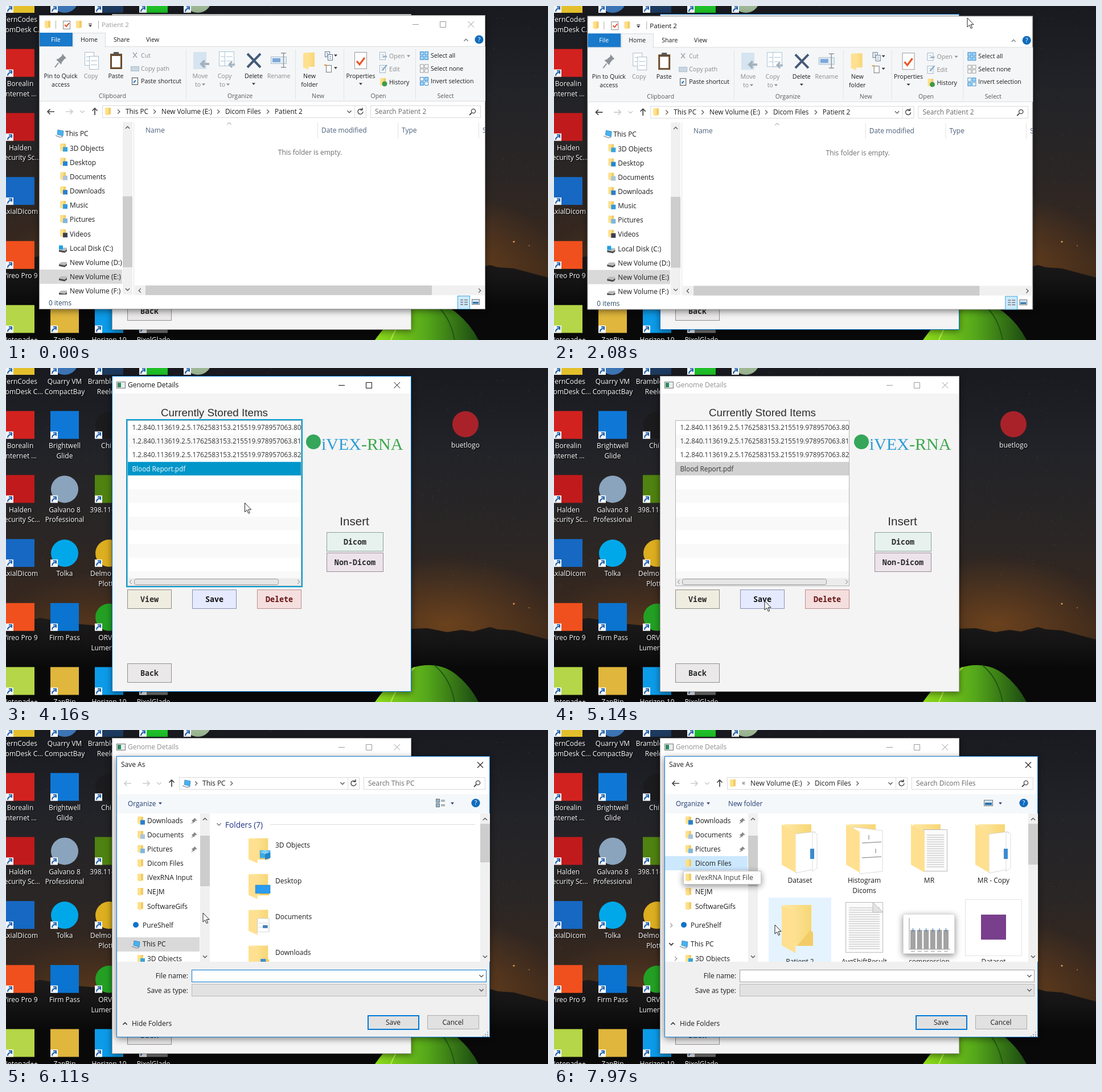
Animation of 952 by 588 pixels, one loop 8 s. Source, as an HTML page:

```html
<!DOCTYPE html>
<html lang="en">
<head>
<meta charset="utf-8">
<title>Saving a file</title>
<style>
html, body { margin: 0; width: 952px; height: 588px; overflow: hidden; background: #0b0a0a; }
svg { display: block; }
text { font-family: "Open Sans", "Noto Sans", sans-serif; white-space: pre; }
.mid { text-anchor: middle; }
.end { text-anchor: end; }
.head { font-family: "Liberation Sans", Arial, sans-serif; }
.mono { font-family: "Noto Sans Mono", "DejaVu Sans Mono", monospace; font-weight: 700; text-anchor: middle; }
.serif { font-family: "Liberation Serif", serif; }
.label { text-anchor: middle; text-shadow: 1px 1px 2px #000; }
.shadow { filter: drop-shadow(0 3px 6px #0007); }
</style>
</head>
<body>
<svg id="stage" width="952" height="588" viewBox="0 0 952 588">
  <defs>
    <linearGradient id="sky" x2="0" y2="1">
      <stop offset="0" stop-color="#181a1f"/><stop offset=".25" stop-color="#222328"/>
      <stop offset=".5" stop-color="#2a2625"/><stop offset=".7" stop-color="#36271e"/><stop offset=".78" stop-color="#3e2a1b"/>
    </linearGradient>
    <linearGradient id="ridge" x2="0" y2="1">
      <stop offset="0" stop-color="#1c1a1a"/><stop offset=".3" stop-color="#151414"/><stop offset=".6" stop-color="#090909"/>
    </linearGradient>
    <radialGradient id="glow"><stop offset="0" stop-color="#98591f" stop-opacity=".5"/><stop offset="1" stop-color="#98591f" stop-opacity="0"/></radialGradient>
    <linearGradient id="tent"><stop offset="0" stop-color="#8fdc1c"/><stop offset=".5" stop-color="#55a81a"/><stop offset="1" stop-color="#1c4a12"/></linearGradient>
    <linearGradient id="gold"><stop offset="0" stop-color="#ffe8a4"/><stop offset="1" stop-color="#f7d675"/></linearGradient>
  </defs>
  <g id="desktop"></g>
  <g id="scene"></g>
</svg>
<script>
const LOOP = 8000, INK = '#1c1c1c', GREY = '#8b8b8b', BLUE = '#0078d7';

// Drawing helpers; text is placed by the middle of its line
const T = (x, y, s, size = 12, fill = INK, cls = '') =>
  `<text x="${x}" y="${y + size * .36}" font-size="${size}" fill="${fill}" class="${cls}">${s}</text>`;
const R = (x, y, w, h, fill, line, more = '') => line
  ? `<rect x="${x + .5}" y="${y + .5}" width="${w - 1}" height="${h - 1}" fill="${fill}" stroke="${line}" ${more}/>`
  : `<rect x="${x}" y="${y}" width="${w}" height="${h}" fill="${fill}" ${more}/>`;
const P = (d, line = '#444', w = 1.2, fill = 'none') =>
  `<path d="${d}" stroke="${line}" stroke-width="${w}" fill="${fill}"/>`;
const C = (x, y, r, fill) => `<circle cx="${x}" cy="${y}" r="${r}" fill="${fill}"/>`;
const G = (body, move, more = '') => `<g transform="${move}" ${more}>${body}</g>`;
const clip = (x, y, w, h, body) =>
  `<svg x="${x}" y="${y}" width="${w}" height="${h}" viewBox="${x} ${y} ${w} ${h}">${body}</svg>`;
const each = (list, f) => list.map(f).join('');
const tri = (x, y, c = '#333') => P(`M${x - 3} ${y - 1.5}h6l-3 3.5z`, 'none', 0, c);
const chev = (x, y, turn = 0, c = '#555', w = 1.3) =>
  G(P('M-1.8-3.6 1.8 0-1.8 3.6', c, w), `translate(${x} ${y}) rotate(${turn})`);
const arrow = (x, y, turn, c) => G(P('M6 0H-6M-1.5-4.5-6 0l4.5 4.5', c, 1.7), `translate(${x} ${y}) rotate(${turn})`);
const help = (x, y) => C(x, y, 7.6, '#0f6cbd') + T(x, y, '?', 11, '#fff', 'mid');

// Icons
const folder = (x, y) => R(x + 2, y, 8, 12, '#f0cc68') + P(`M${x} ${y}h6v14l-6-2z`, 'none', 0, '#ffe08a');
const marked = (x, y, c) => folder(x, y) + R(x + 5, y + 6, 8, 8, c);
const pc = (x, y) => P(`M${x + 4} ${y}l10 2-1 9-10-3z`, '#2b78b5', .7, '#48b2ee') + P(`M${x} ${y + 10}l8 3 5-1`, '#8fa0ac', 1.5);
const drive = (x, y) => P(`M${x} ${y + 6}l4-3h10v5l-4 3-10-1z`, 'none', 0, '#b9bcbe') + P(`M${x} ${y + 7}l10 2 4-3v3l-4 3-10-2z`, 'none', 0, '#4a4a4a');
const sheet = (x, y, w = 13, h = 15, c = '#9aa5af') =>
  R(x, y, w, h, '#fff', c) + P(`M${x + 3} ${y + h * .35}h${w - 6}m0 ${h * .3}h${6 - w}`, c, 1);
const bigFolder = (x, y, inside = '') => R(x + 4, y + 1, 48, 72, 'url(#gold)') +
  P(`M${x + 50} ${y + 46}l5 3v24h-28z`, 'none', 0, '#f2cc66') + inside +
  P(`M${x} ${y + 1}l24 13v72l-24-14z`, 'none', 0, '#ffe090');
const lined = (x, y, w, h) => R(x, y, w, h, '#fbfbfb', '#bbb') +
  each([...Array(Math.floor(h / 4) - 3).keys()], i => P(`M${x + 6} ${y + 10 + i * 4}h${w - 12}`, '#a8a8a8', .8));

const windowButtons = (x, y, c) =>
  P(`M${x} ${y + .5}h11M${x + 48.5} ${y - 4.5}h10v10h-10zM${x + 97.5} ${y - 5}l10.5 10.5m0-10.5l-10.5 10.5`, c, 1);
const scrollbar = (x, y, h, top, bottom) => R(x, y, 17, h, '#f0f0f0') + R(x, top, 17, bottom - top, '#cdcdcd') +
  chev(x + 8.5, y + 10, 270) + chev(x + 8.5, y + h - 9, 90);
const addressBar = (x, y, right, end, back, place, search) =>
  arrow(x + 7, y, 0, back) + arrow(x + 39, y, 180, '#ccc') + chev(x + 62, y, 90, '#999', 1) + arrow(x + 84, y, 90, '#444') +
  R(x + 97, y - 11, right - x - 97, 22, '#fff', '#d9d9d9') + place + chev(right - 30, y, 90) +
  R(right - 21, y - 11, 1, 22, '#ddd') +
  P(`M${right - 7} ${y - 3}a4.5 4.5 0 1 0 1 3m-1-7v4h-4`, '#444', 1.4) +
  R(right + 7, y - 11, end - right - 7, 22, '#fff', '#d9d9d9') + T(right + 15, y, search, 12, '#6a6a6a') +
  `<circle cx="${end - 13}" cy="${y - 1}" r="3.6" fill="none" stroke="#444" stroke-width="1.3"/>` +
  P(`M${end - 16} ${y + 2}l-4 4`, '#444', 1.8);

function desktop() {
  let seed = 7, out = R(0, 0, 952, 588, 'url(#sky)') +
    '<ellipse cx="775" cy="450" rx="200" ry="120" fill="url(#glow)"/><ellipse cx="150" cy="450" rx="160" ry="90" fill="url(#glow)" opacity=".5"/>';
  const rnd = () => (seed = seed * 16807 % 2147483647) / 2147483647;
  for (let i = 0; i < 420; i++)
    out += `<circle cx="${(rnd() * 952).toFixed(1)}" cy="${(rnd() * 400).toFixed(1)}" r=".5" fill="#c9ccd2" opacity="${(rnd() * .4).toFixed(2)}"/>`;
  out += C(892, 415, 1.6, '#e8a050') + C(919, 422, 1, '#c07830') +
    P('M0 452l60-12 60 10 70 6 500 4 50-2 35 7 25-4 20 3 30-8 14 4 28 2 60 16V588H0z', 'none', 0, 'url(#ridge)') +
    P('M648 588Q682 540 712 528Q758 514 790 539Q816 560 830 588z', 'none', 0, 'url(#tent)') +
    P('M752 523Q780 545 788 588', '#1f5a12', 2) + P('M718 527Q690 553 676 588', '#b6ee4a', 2);
  const icons = [
    [0, 0, '#e3c02b', 0, 'FernCodes', 'LoomDesk C...'], [1, 0, '#3c74b4', 1, 'Quarry VM', 'CompactBay'],
    [2, 0, '#1d3a5f', 0, 'Brambleware', 'Reelora'], [3, 0, '#1fbf28', 0], [4, 0, '#9db795', 1],
    [0, 1, '#d1221f', 0, 'Borealin', 'Internet ...'], [1, 1, '#0f78d7', 0, 'Brightwell', 'Glide'], [2, 1, '#1b1b1d', 1, 'Chirr'],
    [0, 2, '#c11a1c', 0, 'Halden', 'Security Sc...'], [1, 2, '#8ba4be', 1, 'Galvano 8', 'Professional'], [2, 2, '#4f8210', 0, '398.11-desk'],
    [0, 3, '#1668c2', 0, 'AxialDicom'], [1, 3, '#00a8ea', 1, 'Tolka'], [2, 3, '#dcae20', 1, 'Delmo Pack', 'Plotter'],
    [0, 4, '#f0501e', 0, 'Vireo Pro 9'], [1, 4, '#0b74d0', 0, 'Firm Pass'], [2, 4, '#23a023', 1, 'ORVEX', 'Lumen Dev'],
    [0, 5, '#b5d648', 0, 'Notepad++'], [1, 5, '#e0b63c', 0, 'ZapBin'], [2, 5, '#0c9be8', 0, 'Horizon 10'], [3, 5, '#777', 0, 'PixelGlade'],
  ];
  out += each(icons, ([col, row, color, round, a = '', b = '']) => {
    const x = 25 + col * 78, y = 24 + row * 112.7;
    return (round ? C(x, y - 36, 24, color) : R(x - 25, y - 61, 50, 49, color)) +
      R(x - 25, y - 25, 13, 13, '#f4f6f8') + P(`M${x - 22} ${y - 14}q0-5 6-6m-4-2.5h5v5`, '#1b5fae', 2) +
      T(x, y, a, 12, '#fff', 'label') + T(x, y + 17.5, b, 12, '#fff', 'label');
  });
  return out + C(807, 99, 23, '#a9222a') + T(807, 136, 'buetlogo', 12, '#fff', 'label');
}

function explorer(t) {
  if (t >= 2310) return '';
  const active = t >= 1970, S = 10.6;
  const rt = (x, y, s, c = INK, cls = 'mid') => T(x, y, s, S, c, cls);
  const lt = (x, y, s, c = INK) => rt(x, y, s, c, '');
  let o = R(58, 16, 784, 518, '#fff', '#9a9a9a', 'class="shadow"');

  // Title and tabs
  o += folder(68, 26) + R(87, 26, 1, 14, '#aaa') + R(100, 26, 13, 15, '#fff', '#888') + P('M103 33l3 3 5-6', '#e0522b', 2) +
    folder(123, 26) + tri(148, 35) + R(145, 31, 6, 1, '#333') + R(162, 26, 1, 14, '#aaa') +
    T(168, 33, 'Patient 2', 11.6, active ? '#111' : '#999') + (active ? '' : windowButtons(714, 32, '#999')) +
    R(59, 47, 58, 25, '#1979ca') + lt(79, 59, 'File', '#fff') + R(59, 72, 783, 95, '#f5f6f7') +
    R(59, 71, 783, 1, '#dadbdc') + R(118, 47, 57, 26, '#f5f6f7', '#dadbdc') + R(119, 71, 55, 3, '#f5f6f7') +
    lt(131, 59, 'Home') + lt(189, 59, 'Share') + lt(246, 59, 'View') + chev(808, 60, 270, '#777') + help(831, 59) +
    R(59, 167, 783, 1, '#dadbdc') + each([316, 508, 593, 719], x => R(x, 76, 1, 88, '#e2e3e4'));

  // Ribbon
  o += P('M99 84l7 8-3 1-5 6-1 4-9-9 4-1 6-5z', 'none', 0, '#8b9299') + P('M92 100l-6 8', '#8b9299', 2) +
    each(['Pin to Quick', 'access'], (s, i) => rt(96, 123 + 15 * i, s)) +
    sheet(138, 81, 17, 24, '#a9bccb') + sheet(146, 88, 17, 24, '#a9bccb') + rt(149, 123, 'Copy', GREY) +
    R(183, 84, 21, 27, '#6b4a2c') + R(189, 81, 9, 5, '#555') + R(186, 88, 15, 20, '#fff') + rt(193, 123, 'Paste') +
    P('M223 82l7 9m0-9l-7 9', '#9aa5b0', 1.4) + lt(237, 87, 'Cut', GREY) +
    R(219, 106, 15, 9, '#c9d6e2', '#a9bccb') + lt(237, 110, 'Copy path', GREY) +
    R(221, 126, 11, 13, '#fff', '#444') + P('M224 135l4-4', '#1b6fc0', 2) + lt(237, 132, 'Paste shortcut') + rt(187, 158, 'Clipboard', '#5a5a5a') +
    R(329, 81, 23, 30, '#d5e4f0') + P('M357 102h-14m6-6l-6 6 6 6', '#a4b2be', 4) + rt(341, 123, 'Move', GREY) + rt(337, 138, 'to', GREY) + tri(347, 138, GREY) +
    sheet(374, 80, 17, 26, '#a9c3d8') + sheet(384, 80, 17, 26, '#a9c3d8') + P('M402 103h-10m5-5l-5 5 5 5', '#a4b2be', 3) +
    rt(384, 123, 'Copy', GREY) + rt(380, 138, 'to', GREY) + tri(390, 138, GREY) +
    P('M424 84l23 24m0-24l-23 24', '#445a78', 4) + rt(435, 123, 'Delete') + tri(435, 137) +
    R(465, 89, 28, 13, '#e4eef6', '#a9bccb') + R(468, 92, 14, 7, '#7ba8d8') + P('M483 83h9m-4.5 0v25m-4.5 0h9', '#8b9299', 1.4) + rt(479, 123, 'Rename', GREY) + rt(411, 158, 'Organize', '#5a5a5a') +
    R(524, 82, 18, 25, 'url(#gold)') + P('M522 83l9 4v25l-9-4z', 'none', 0, '#ffe090') + rt(533, 123, 'New') + rt(533, 138, 'folder') +
    sheet(560, 80, 9, 10, '#55738f') + sheet(565, 85, 9, 11, '#55738f') + tri(579, 87) + R(562, 104, 10, 13, '#fff', '#777') + P('M559 104h4', '#d89a2a', 2) + tri(579, 109) + rt(548, 158, 'New', '#5a5a5a') +
    R(612, 81, 22, 30, '#fff', '#999') + P('M616 97l5 6 9-12', '#e8562a', 3.2) + rt(623, 123, 'Properties') + tri(623, 137) +
    sheet(656, 81, 11, 14, '#9db4c8') + P('M669 89h-7', '#9db4c8', 3) + lt(673, 88, 'Open', GREY) + tri(707, 88, GREY) +
    sheet(656, 104, 11, 14, '#9db4c8') + P('M669 104l-8 9', '#7ea6c6', 2) + lt(673, 111, 'Edit', GREY) +
    folder(657, 127) + C(665, 137, 4.5, '#3f9a4a') + lt(673, 134, 'History') + rt(654, 158, 'Open', '#5a5a5a');
  o += each(['Select all', 'Select none', 'Invert selection'], (s, i) => {
    const y = 80 + 22.5 * i;
    return each([0, 1, 2, 3], k => R(727 + (k % 2) * 8, y + (k >> 1) * 8, 7, 7,
      i == 0 || (i == 2 && (k == 1 || k == 2)) ? '#9fd3f7' : '#fff', i == 1 ? '#999' : '#3a8fd0')) + lt(746, y + 7.3, s);
  }) + rt(772, 158, 'Select', '#5a5a5a');

  o += addressBar(72, 186, 633, 834, '#444', folder(174, 179) +
    each([[210, 'This PC'], [273, 'New Volume (E:)'], [385, 'Dicom Files'], [472, 'Patient 2']],
      ([x, s]) => chev(x - 12, 186) + T(x, 185.5, s, 11.8)), 'Search Patient 2');

  // Navigation
  const rows = ['3D Objects', 'Desktop', 'Documents', 'Downloads', 'Music', 'Pictures', 'Videos',
    'Local Disk (C:)', 'New Volume (D:)', 'New Volume (E:)', 'New Volume (F:)'];
  const marks = ['#35a5dc', '#1f86d8', '#a9c4dc', '#2a7fd0', '#2f9be0', '#7db7de', '#3b3f52'];
  o += clip(59, 204, 145, 304, R(59, 464, 145, 25, '#d9d9d9') + pc(87, 218) + T(104, 225, 'This PC') +
    each(rows, (s, i) => {
      const y = 250.3 + 25.17 * i;
      return (i < 7 ? marked(95, y - 8, marks[i]) : drive(93, y - 4) + (i == 7 ? R(93, y - 5, 7, 7, '#1ba1e8') : '')) + T(112, y, s, 11.9);
    })) + scrollbar(205, 204, 304, 335, 460) + R(224, 204, 1, 304, '#e4e4e4');

  // File list
  o += each([547, 688, 830], x => R(x, 205, 1, 28, '#e2e2e2')) + chev(392, 207, 270, '#888', 1) +
    clip(226, 205, 616, 60, each([[245, 'Name'], [554, 'Date modified'], [695, 'Type'], [837, 'Size']], ([x, s]) => T(x, 219, s, 12, '#4c607a'))) +
    T(534, 258, 'This folder is empty.', 12, '#6d6d6d', 'mid') +
    R(226, 492, 615, 17, '#f0f0f0') + R(245, 492, 503, 17, '#cdcdcd') + chev(235, 501, 180) + chev(832, 501) +
    T(75, 523, '0 items', 11.8, '#2b4a66') + R(793, 510, 22, 24, '#cfeafb', '#3aa6dd') +
    each([0, 4, 8], d => P(`M798 ${517.5 + d}h5m2 0h6`, '#777', 1.5)) + R(818, 516, 14, 10, '#cfe3f2', '#777') + R(820, 521, 10, 3, '#2b6fa8');
  if (t < 2080) return o;
  return t < 2190 ? G(o, 'translate(.5 1.4) scale(.9985)') : G(o, 'translate(45 60) scale(.9)', 'opacity=".45"');
}

function app(t) {
  const active = t >= 2080 && t < 5040, focus = t >= 3730 && t < 4930;
  const heat = t < 2630 ? 0 : t < 2740 ? .7 : t < 2840 ? .45 : t < 2960 ? .2 : 0;
  const button = (x, y, w, s, fill, line, ink = '#2b2b2b') => R(x, y, w, 34, fill, line) + T(x + w / 2, y + 17, s, 13.4, ink, 'mono');
  const uid = '1.2.840.113619.2.5.1762583153.215519.978957063.8';
  let o = R(186, 14, 526, 556, '#f4f4f4', active ? BLUE : '#aaa', 'class="shadow"') + R(187, 15, 524, 30, '#fff') +
    R(662, 15, 49, 30, '#e81123', '', `opacity="${heat}"`) +
    R(194, 24, 16, 12, '#e8eef2', '#777') + R(196, 26, 6, 8, '#2d8a5a') +
    T(214, 30, 'Genome Details', 12, active ? '#111' : '#8f8f8f') + windowButtons(584, 30, active ? '#111' : '#9a9a9a') +
    T(366, 78, 'Currently Stored Items', 18.8, '#2c2c2c', 'head mid') + T(612, 270, 'Insert', 20.6, '#2c2c2c', 'head mid');
  o += R(213, 92, 306, 292, '#fff', '#b4b4b4') + clip(214, 93, 304, 277,
    each([...Array(12).keys()], i => R(214, 93 + 24.1 * i, 304, 24.1, i == 3 ? (focus ? '#0096c9' : '#d1d1d1') : i % 2 ? '#f9f9f9' : '#fff')) +
    each([uid + 0, uid + 1, uid + 2, 'Blood Report.pdf'], (s, i) => T(221.5, 105 + 24.1 * i, s, 11.75, i == 3 && focus ? '#fff' : '#333'))) +
    R(214, 370, 304, 13, '#ececec') + R(225, 371, 254, 11, '#e6e6e6', '#999', 'rx="3"') + chev(219, 376.5, 180, '#777', 1) + chev(514, 376.5, 0, '#777', 1) +
    (focus ? `<rect x="212" y="91" width="308" height="294" fill="none" stroke="#039ed3" stroke-width="2"/>` : '');
  return o + C(540, 130, 13, '#35a65a') + T(554, 133, 'iVEX<tspan fill="#3aa84c">-RNA</tspan>', 30, '#2a9bd6', 'serif') +
    button(213, 390, 78, 'View', '#efece0', '#8f8c80') + button(327, 390, 78, 'Save', '#e5eaff', '#8792b5', '#111') +
    button(441, 390, 78, 'Delete', '#f5dede', '#b98f8f', '#651111') + button(213, 520, 78, 'Back', '#eae8e9', '#8f8d8e') +
    button(563, 289, 100, 'Dicom', '#e7f2ef', '#8aa099') + button(563, 325, 100, 'Non-Dicom', '#ece3eb', '#978c95');
}

function pcFolders(t) {
  const inside = [
    R(30, 42, 28, 26, '#3fa9e4') + P('M30 48l14-7 14 7-14 7z', 'none', 0, '#7fd0f5') + P('M44 55l14-7v20l-14 6z', 'none', 0, '#2587c8'),
    R(18, 38, 40, 29, '#2b9cf0', '#1671b8'), sheet(23, 30, 32, 46, '#a9bccb') + R(38, 53, 13, 10, '#3c7fb8'), R(32, 46, 14, 40, '#3f8fd4')];
  return chev(374, 166, 90, '#777') + T(385, 167, 'Folders (7)', 13.6, '#1e3287') + R(464, 166, 360, 1, '#dcdcdc') +
    (t >= 5700 && t < 5930 ? R(378, 372, 260, 60, '#e5f3ff') : '') +
    each(['3D Objects', 'Desktop', 'Documents', 'Downloads'], (s, i) => {
      const y = 190 + 63 * i;
      return G(bigFolder(0, 0) + inside[i], `translate(426 ${y}) scale(.66 .52)`) + T(473, y + 13, s);
    });
}

function dicomFiles(t) {
  const slides = P('M24 18l34-4v66l-34 7z', '#c8c8c8', .7, '#fff') + P('M54 14l8 4v60l-8 6z', '#ccc', .7, '#fff') + R(50, 44, 7, 18, '#3b8bd0');
  const papers = P('M12 6l52 6v72l-40 4z', '#c9c9c9', .7, '#fff') + P('M28 34l34-2M28 60l34-2M40 20v8M52 44v8', '#777', 1);
  const spots = [432, 545, 659, 772];
  return (t >= 7970 ? R(377, 295, 110, 120, '#e5f3ff') : '') +
    each([slides, papers, G(lined(0, 0, 42, 74), 'translate(22 10)'), slides], (s, i) => G(bigFolder(0, 0, s), `translate(${spots[i] - 32} 165)`)) +
    each(['Dataset', 'Histogram', 'MR', 'MR - Copy'], (s, i) => T(spots[i], 265, s, 12, INK, 'mid')) + T(545, 283, 'Dicoms', 12, INK, 'mid') +
    bigFolder(400, 307) + lined(512, 303, 66, 89) + P('M560 303l18 18h-18z', '#bbb', 1, '#e2e2e2') +
    R(613, 324, 91, 70, '#fff', '#ddd', 'class="shadow"') + P('M624 331v55h72', '#777', .8) +
    each([0, 1, 2, 3, 4, 5], i => R(626 + 11.6 * i, 352, 9, 34, '#a3a3a3') + P(`M${630.5 + 11.6 * i} 349v6`, '#2b6fc0', 1) + R(627 + 11.6 * i, 389, 7, 1, '#999')) +
    R(722, 298, 100, 100, '#fff', '#e2e2e2') + R(750, 325, 44, 44, '#7a3f8c') +
    each(['Patient 2', 'AvgShiftResult', 'compression', 'Dataset'], (s, i) => T(spots[i], 407.5, s, 12, INK, 'mid'));
}

function dialog(t) {
  if (t < 5250) return '';
  const opened = t >= 7310, clicked = t >= 7210, hover = t >= 6880, chevrons = t >= 6350;
  let o = R(194, 46, 656, 495, '#f0f0f0', '#1a80d9', 'class="shadow"') + R(195, 47, 654, 66, '#fff') + R(195, 113, 654, 34, '#f5f8fa') +
    T(202, 61, 'Save As') + P('M828 56.5l10 10m0-10l-10 10', '#222', 1.1) +
    addressBar(207, 94, 621, 842, opened ? '#444' : '#ccc', opened
      ? folder(309, 87) + T(330, 93, '«', 12, '#555') + T(345, 94, 'New Volume (E:)') + chev(447, 94) + T(458, 94, 'Dicom Files') + chev(533, 94)
      : pc(310, 88) + chev(334, 94) + T(345, 94, 'This PC') + chev(396, 94), opened ? 'Search Dicom Files' : 'Search This PC') +
    T(214, 129.5, 'Organize', 11.8, '#1f3b73') + tri(271, 129, '#1f3b73') + (opened ? T(306, 129.5, 'New folder', 11.8, '#1f3b73') : '') +
    (opened ? R(755, 123, 16, 11, '#cfe3f2', '#777') + R(757, 128, 12, 4, '#2b6fa8') : each([121, 129], y => R(755, y, 7, 7, '#8bb8d8', '#777') + R(764, y + 2, 7, 1, '#777') + R(764, y + 4, 7, 1, '#777'))) +
    tri(784, 129, '#1f3b73') + help(825, 128.5) + R(195, 147, 654, 261, '#fff');

  const rows = ['Downloads', 'Documents', 'Pictures', 'Dicom Files', 'iVexRNA Input', 'NEJM', 'SoftwareGifs'];
  const marks = ['#2a7fd0', '#a9c4dc', '#7db7de'];
  const tint = opened ? R(195, 222, 145, 25, '#cce8ff') : clicked ? R(195, 222, 145, 25, '#cce8ff', '#99d1ff') : hover ? R(195, 222, 145, 25, '#e5f3ff') : '';
  o += clip(195, 147, 145, 261, tint + (clicked ? '' : R(195, 365, 145, 25, '#d9d9d9')) +
    each(rows, (s, i) => {
      const y = 159.6 + 25.1 * i;
      return (i < 3 ? marked(231, y - 7, marks[i]) + P(`M331 ${y - 5}l5 5-3 0-3 4-4-4 4-3z`, 'none', 0, '#8a8a8a') + P(`M329 ${y + 2}l-3 3`, '#8a8a8a') : folder(231, y - 7)) + T(248, y, s);
    }) + C(228, 343, 5, '#1273c8') + T(240, 344, 'PureShelf') + pc(221, 371) + T(240, 377, 'This PC') + marked(231, 396, '#35a5dc') + T(248, 402.5, '3D Objects') +
    (chevrons ? chev(206, 344, 0, '#999') + chev(206, 377, 90, '#333', 1.7) + chev(214, 402.5, 0, '#999') : '')) +
    scrollbar(341, 147, 261, 186, 275) +
    clip(359, 147, 474, 261, !opened ? pcFolders(t) : t >= 7450 ? dicomFiles(t) : '') + scrollbar(833, 147, 261, 165, opened ? 237 : 233);

  o += T(320, 433, 'File name:', 12, INK, 'end') + R(326, 422, 518, 22, '#fff', opened ? '#a0a0a0' : BLUE) + chev(835, 433, 90) +
    T(320, 458.5, 'Save as type:', 12, INK, 'end') + R(326, 447, 518, 22, '#e2e2e2', '#b8b8b8') + chev(835, 458, 90) +
    chev(209, 517, 270, '#333', 1.6) + T(221, 517, 'Hide Folders') +
    `<rect x="636" y="503" width="89" height="24" fill="#e1e1e1" stroke="${BLUE}" stroke-width="2"/>` + T(680, 515, 'Save', 12, INK, 'mid') +
    R(740, 502, 91, 25, '#e1e1e1', '#adadad') + T(785, 515, 'Cancel', 12, INK, 'mid') +
    each([[845, 531], [841, 535], [845, 535], [837, 538], [841, 538], [845, 538]], ([x, y]) => R(x, y, 2, 2, '#aaa'));
  if (t >= 7770) o += R(227, 248, 137, 24, '#fff', '#c4c4c4', 'class="shadow" opacity=".93"') + folder(231, 253) + T(248, 260, 'iVexRNA Input File', 12, '#444');
  const k = t < 5360 ? .35 : t < 5470 ? .8 : 1;
  return k < 1 ? G(o, `translate(522 293) scale(${.9 + .1 * k}) translate(-522 -293)`, `opacity="${k}"`) : o;
}

// Pointer moves: first step, last step, number of steps, end point
const moves = [[320, 320, 1, 747, 309], [430, 540, 2, 703, 123], [870, 1210, 4, 726, 21], [2630, 2840, 3, 556, 102],
  [2960, 3400, 5, 436, 180], [4160, 4500, 4, 370, 410], [5700, 5780, 2, 378, 402], [5930, 6110, 3, 346, 322],
  [6250, 6880, 7, 290, 238], [7770, 7970, 3, 388, 343]];

function pointer(t) {
  if (t < 320) return '';
  let x = 0, y = 0;
  for (const [start, end, n, toX, toY] of moves) {
    if (t < start) break;
    const k = Math.min(n, 1 + Math.floor((t - start) * (n - 1) / (end - start || 1) + .05)) / n;
    x += (toX - x) * k;
    y += (toY - y) * k;
  }
  const hand = t > 6600 && x < 335;
  return G(hand
    ? P('M-1.5 1q1.5-2 3 0v6l7 1.5q2 .5 2 3l-1.5 7.5h-8l-5-7q0-2 2.5-1z', '#222', 1, '#fff')
    : P('M0 0v16l3.7-3.6 2.6 6 2.4-1-2.6-5.7h5z', '#222', 1, '#fff'), `translate(${x.toFixed(1)} ${y.toFixed(1)})`);
}

const scene = document.getElementById('scene');
let last;
function frame(now) {
  const t = now % LOOP;
  const picture = app(t) + explorer(t) + dialog(t) + pointer(t);
  if (picture !== last) scene.innerHTML = last = picture;
  requestAnimationFrame(frame);
}
document.getElementById('desktop').innerHTML = desktop();
frame(performance.now());
</script>
</body>
</html>
```
